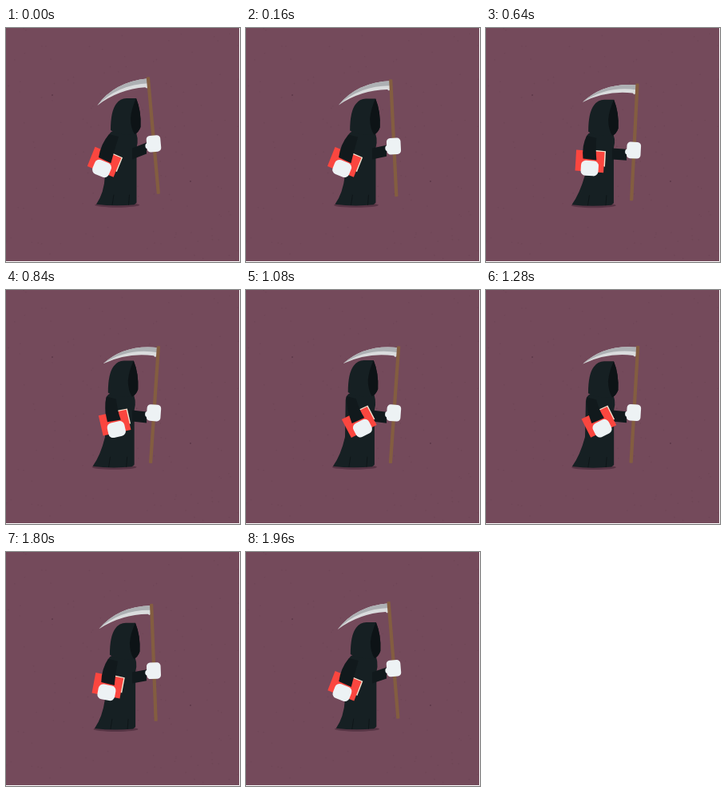
An HTML page that plays this animation: 293x293 px, repeating every 2000 ms.

```html
<!DOCTYPE html>
<html lang="en">
<head>
<meta charset="utf-8">
<title>Walking reaper</title>
<style>
  html, body { margin: 0; width: 100%; height: 100%; overflow: hidden; background: #744a5b; }
  svg { display: block; width: 100vw; height: 100vh; }
</style>
</head>
<body>
<svg viewBox="0 0 293 293">
  <g id="grain" fill="#4c2d3b"></g>
  <g id="scene"></g>
  <path d="M292.5 0V292.5H0" fill="none" stroke="#fff"/>
</svg>
<script>
const LOOP = 2000, STEP = 40;
const CLOTH = '#162023', SLEEVE = '#11191c', DARK = '#0d1316', GLOVE = '#edf2f4';

const smooth = x => (1 - Math.cos(Math.PI * x)) / 2;

// The back arm swings forward slowly and returns faster
const ARM_PEAK = 1150;
const armSwing = t => t < ARM_PEAK
  ? smooth((t / ARM_PEAK) ** 1.5)
  : smooth(((LOOP - t) / (LOOP - ARM_PEAK)) ** 0.8);

const path = (d, fill) => `<path d="${d}" fill="${fill}"/>`;
const group = (x, y, angle, inner) =>
  `<g transform="translate(${x} ${y}) rotate(${angle})">${inner}</g>`;

// Staff, blade and front glove turn about the grip
function scythe(y, tilt) {
  const blade = path('M0 1Q-42 0 -67 27Q-38 10 -5 11.5L-3 13L0 11Z', '#dadcdd') +
    path('M0 1Q-42 0 -67 27Q-38 4 0 7Z', '#adb0b3');
  return group(185.2, y, -tilt,
    group(0, -83, -0.3 * tilt, blade) +
    '<rect x="-2" y="-84" width="4.2" height="147" rx="1" fill="#835d40"/>' +
    `<ellipse cx="-8" cy="2" rx="3" ry="3.5" fill="${GLOVE}"/>` +
    `<rect x="-9" y="-10.5" width="17.6" height="20.6" rx="4.5" fill="${GLOVE}"/>`);
}

function frontArm(y) {
  return path(`M158 150.5L176 ${y - 1.5}V${y + 12.5}L158 164.5Z`, SLEEVE);
}

function robe(hx, hy, left, right, y) {
  const fold = (x, lean) =>
    `<path d="M${x} ${y}l${lean} -13" stroke="${DARK}" stroke-width=".8"/>`;
  return `<ellipse cx="${(left + right) / 2 + 1}" cy="${y}" rx="28" ry="3" fill="#563444"/>` +
    path(`M${134 + hx} ${129 + hy}Q${128.5 + hx} ${131 + hy} ${128 + hx} ${138 + hy}` +
      `L124 184Q${left + 10} ${y - 15} ${left} ${y - 1}Q${left + 24} ${y + 2} ${right - 3} ${y - 0.5}` +
      `L${right} ${y - 3}V150Q${right + 3.5} ${137 + hy} ${right - 3} ${126 + hy}Z`, CLOTH) +
    fold(left + 20, 2) + fold(right - 10, 1);
}

function hood(x, y) {
  return group(x, y, 0,
    path('M131 128Q131 104 138 95Q143 88 151 88L163 88Q169.5 104 168.5 124Q166 131 161 133Q140 135 131 128Z', CLOTH) +
    path('M163 88Q169.5 104 168.5 124Q166 131 161 133Q156 125 156 113Q157 101 163 88Z', DARK));
}

function bookArm(x, y, angle, hx, hy) {
  const r = angle * Math.PI / 180, cos = Math.cos(r), sin = Math.sin(r);
  const place = (px, py) => [x + px * cos - py * sin, y + px * sin + py * cos];
  const l = place(-9, -11.5), c = place(8, -10.5);
  const sx = 129 + hx, sy = 133 + hy;
  const book = path('M4 -23L19 -22.5L19 -3L10 -5Z', '#f4e6d2') +
    path('M-18 -22L17.6 -21.5L17.6 4.5L-18 4Z', '#fb463f');
  const sleeve = path(`M${sx} ${sy}Q${(sx + l[0]) / 2 - 4} ${(sy + l[1]) / 2 - 2} ${l}` +
    `L${c}Q${(sx + c[0]) / 2 + 5} ${(sy + c[1]) / 2 + 4} ${sx + 12} ${sy + 3}Z`, SLEEVE);
  const hand = `<rect x="-11" y="-9.5" width="22" height="19" rx="6" fill="${GLOVE}"/>`;
  return group(x, y, angle, book) + sleeve + group(x, y, angle, hand);
}

function draw(t) {
  const half = 1 - Math.abs(1 - 2 * t / LOOP);  // 0 to 1 and back
  const sway = smooth(half ** 0.6);
  const drop = smooth(half ** 0.5);
  const bob = smooth(4 * t / LOOP);             // two steps per loop
  const swing = armSwing(t);

  const gripY = 145 + 9.2 * drop;
  const hx = -3.3 * sway, hy = 2 * bob;
  scene.innerHTML =
    robe(hx, hy, 113 - 4 * sway - 2.5 * bob, 163.5 - 2.5 * sway - 1.7 * bob, 221.7 + 0.6 * bob) +
    frontArm(gripY) +
    scythe(gripY, 5.1 - 9.2 * sway) +
    bookArm(120 + 26.5 * swing, 176 - 3 * swing ** 2, 22 - 50.5 * swing, hx, hy) +
    hood(hx, hy);
}

const scene = document.getElementById('scene');

// Faint paper specks
let seed = 7;
const random = () => (seed = seed * 16807 % 2147483647) / 2147483647;
let specks = '<circle cx="58" cy="84" r=".8"/><circle cx="231" cy="192" r=".8"/>';
for (let i = 0; i < 150; i++) {
  specks += `<circle cx="${random() * 292}" cy="${random() * 292}" r=".7" opacity=".15"/>`;
}
document.getElementById('grain').innerHTML = specks;

let shown = -1;
function tick() {
  const t = Math.floor(performance.now() % LOOP / STEP) * STEP;
  if (t !== shown) draw(shown = t);
  requestAnimationFrame(tick);
}
tick();
</script>
</body>
</html>
```
